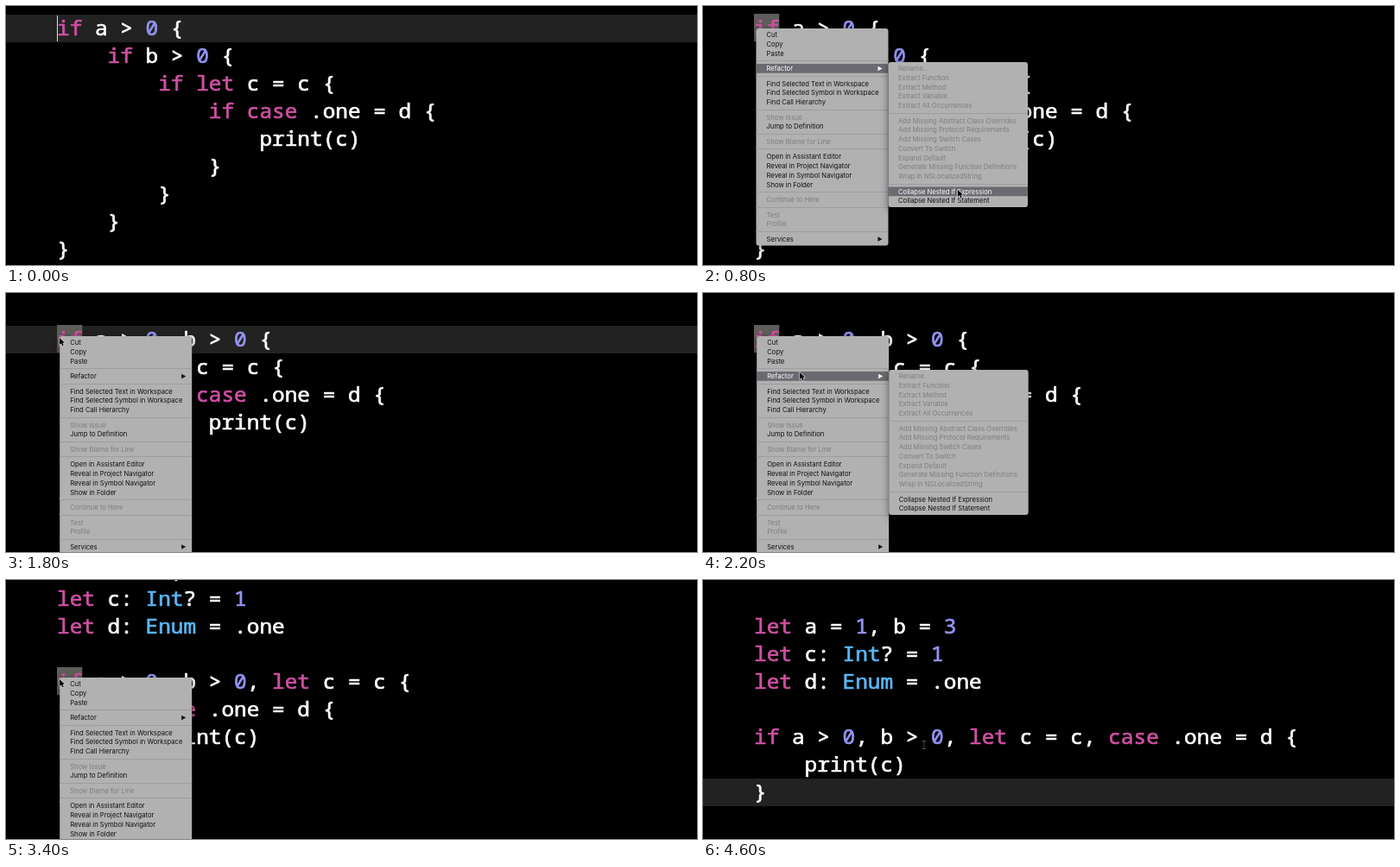
These frames come from a looping animation (800x300 px, 4.8 s). An HTML page with a canvas:

```html
<!DOCTYPE html>
<html lang="en">
<head>
<meta charset="utf-8">
<title>Collapse nested ifs</title>
<style>
html, body { margin: 0; width: 100%; height: 100%; overflow: hidden; background: #000; }
canvas { display: block; }
</style>
</head>
<body>
<canvas id="stage" width="800" height="300"></canvas>
<script>
const ctx = document.getElementById('stage').getContext('2d');
const CODE_FONT = '500 24.4167px "Noto Sans Mono", "DejaVu Sans Mono", monospace';
const MENU_FONT = '7.66px Inter, "Liberation Sans", sans-serif';
const LEFT = 59, COL = 14.65, LINE = 32;
const ITEM = 10.75, GAP = 6.72, PAD = 2.1;
const STEP = 200, LOOP = 4800;

const decls = ['let a = 1, b = 3', 'let c: Int? = 1', 'let d: Enum = .one', ''];

// Nested ifs, one indent deeper per condition, closed in reverse.
function nest(...conds) {
  const pad = n => '    '.repeat(n);
  return [
    ...conds.map((c, i) => `${pad(i)}if ${c} {`),
    pad(conds.length) + 'print(c)',
    ...conds.map((c, i) => pad(conds.length - 1 - i) + '}')
  ];
}

const codes = {
  four: { top: 10, lines: nest('a > 0', 'b > 0', 'let c = c', 'case .one = d') },
  three: { top: 38, lines: nest('a > 0, b > 0', 'let c = c', 'case .one = d') },
  two: { top: -26, lines: [...decls, ...nest('a > 0, b > 0, let c = c', 'case .one = d')] },
  one: { top: 38, lines: [...decls, ...nest('a > 0, b > 0, let c = c, case .one = d')] }
};

// "-" is a separator, "~" marks a disabled item, ">" a submenu.
const mainMenu = ['Cut', 'Copy', 'Paste', '-', 'Refactor>', '-',
  'Find Selected Text in Workspace', 'Find Selected Symbol in Workspace', 'Find Call Hierarchy', '-',
  '~Show Issue', 'Jump to Definition', '-', '~Show Blame for Line', '-',
  'Open in Assistant Editor', 'Reveal in Project Navigator', 'Reveal in Symbol Navigator', 'Show in Folder', '-',
  '~Continue to Here', '-', '~Test', '~Profile', '-', 'Services>'];
const subMenu = ['~Rename...', '~Extract Function', '~Extract Method', '~Extract Variable',
  '~Extract All Occurrences', '-', '~Add Missing Abstract Class Overrides',
  '~Add Missing Protocol Requirements', '~Add Missing Switch Cases', '~Convert To Switch',
  '~Expand Default', '~Generate Missing Function Definitions', '~Wrap In NSLocalizedString', '-',
  'Collapse Nested If Expression', 'Collapse Nested If Statement'];

// Each step overrides the one before; a step with "code" starts afresh.
const steps = [
  { code: 'four', row: 10, caret: 0 },
  { row: null, caret: null, sel: true, menu: 26, tip: [62, 27] },
  { hot: true, sub: true, tip: [80, 70] },
  { tip: [224, 88] },
  { pick: true, tip: [295, 213] },
  { menu: null, tip: null, beam: [295, 216] },
  { code: 'three', row: 230, caret: 1, brace: true, beam: [345, 24] },
  { brace: false, caret: null, beam: [62, 52] },
  { row: 38, caret: 0 },
  { caret: null, sel: true, menu: 50, beam: null, tip: [62, 52] },
  { row: null, tip: [95, 75] },
  { hot: true, sub: true, tip: [112, 92] },
  { pick: true, tip: [290, 235] },
  { tip: [296, 237] },
  { code: 'two', row: 230, caret: 1, brace: true, beam: [190, 89] },
  { brace: false, caret: null, beam: [48, 116] },
  { caret: 1, beam: [62, 117] },
  { row: null, caret: null, sel: true, menu: 113, beam: null, tip: [62, 115] },
  { hot: true, tip: [100, 156] },
  { sub: true, tip: [279, 201] },
  { tip: [282, 297] },
  { sub: false, tip: null },
  { code: 'one', row: 230, caret: 1, brace: true, beam: [256, 191] },
  { brace: false, caret: null }
];
const states = [];
for (const s of steps) states.push(s.code ? s : { ...states.at(-1), ...s });

function rect(color, x, y, w, h, r = 0) {
  ctx.fillStyle = color;
  ctx.beginPath();
  ctx.roundRect(x, y, w, h, r);
  ctx.fill();
}

function colorOf(word) {
  if (/^(if|let|case)$/.test(word)) return '#d050a4';
  if (/^(Int|Enum)$/.test(word)) return '#5ab8f6';
  if (/^\d/.test(word)) return '#9494f4';
  return '#fff';
}

function drawCode({ code, row, caret, sel, brace }) {
  const { top, lines } = codes[code];
  const first = lines.findIndex(l => l.startsWith('if'));
  const ifTop = top + first * LINE;
  if (row != null) rect('#222', 0, row, 800, LINE);
  if (sel) rect('#5f5d59', LEFT, ifTop - 1, 2 * COL, LINE);
  if (brace) rect('#fdf65a', LEFT + (lines[first].length - 1) * COL - 1.5, ifTop - 1, 17, LINE, 5);
  ctx.font = CODE_FONT;
  ctx.textBaseline = 'alphabetic';
  ctx.lineWidth = .7;
  ctx.lineJoin = 'round';
  lines.forEach((line, i) => {
    for (const { 0: word, index } of line.matchAll(/\w+|[^\w\s]/g)) {
      const x = LEFT + index * COL, y = top + i * LINE + 23.7;
      ctx.fillStyle = ctx.strokeStyle = colorOf(word);
      ctx.fillText(word, x, y);
      ctx.strokeText(word, x, y); // a slightly heavier weight
    }
  });
  if (caret != null) rect('#ddd', LEFT + caret * COL, row + 1, 1, LINE - 2);
}

function drawMenu(items, x, y, w, indent, active) {
  const gaps = items.filter(i => i === '-').length;
  const h = (items.length - gaps) * ITEM + gaps * GAP + 2 * PAD;
  ctx.save();
  ctx.shadowColor = 'rgba(0,0,0,.5)';
  ctx.shadowBlur = 8;
  ctx.shadowOffsetY = 3;
  rect('#b1b1b1', x, y, w, h, 3);
  ctx.restore();
  ctx.font = MENU_FONT;
  ctx.textBaseline = 'alphabetic';
  let top = y + PAD;
  for (const item of items) {
    if (item === '-') {
      rect('#9d9d9d', x, Math.round(top + GAP / 2 - .5), w, 1);
      top += GAP;
      continue;
    }
    const label = item.replace(/[~>]/g, ''), on = label === active, mid = top + ITEM / 2;
    if (on) rect('#6b6a70', x, top, w, ITEM);
    ctx.fillStyle = on ? '#fff' : item[0] === '~' ? '#7e7e7e' : '#111';
    ctx.fillText(label, x + indent, mid + 2.8);
    if (item.endsWith('>')) {
      const tx = x + w - 12;
      ctx.beginPath();
      ctx.moveTo(tx, mid - 2.7);
      ctx.lineTo(tx + 5, mid);
      ctx.lineTo(tx, mid + 2.7);
      ctx.fill();
    }
    top += ITEM;
  }
}

function drawArrow([x, y]) {
  const p = new Path2D(`M${x} ${y}v8l1.9-1.7 1.4 3 1.4-.6-1.3-2.9h2.5z`);
  ctx.lineWidth = 1.2;
  ctx.strokeStyle = '#ddd';
  ctx.stroke(p);
  ctx.fillStyle = '#000';
  ctx.fill(p);
}

function drawBeam([x, y]) {
  ctx.lineWidth = 1;
  ctx.strokeStyle = '#4c4c4c';
  ctx.stroke(new Path2D(`M${x - 2.5} ${y - 4.5}h5M${x} ${y - 4.5}v9M${x - 2.5} ${y + 4.5}h5`));
}

function draw(state) {
  rect('#000', 0, 0, 800, 300);
  drawCode(state);
  if (state.menu != null) {
    const x = state.menu === 26 ? 61.5 : 62.2;
    drawMenu(mainMenu, x, state.menu, 153, 12, state.hot && 'Refactor');
    if (state.sub) {
      const subTop = state.menu + 3 * ITEM + GAP;
      drawMenu(subMenu, x + 153, subTop, 161.5, 11.5, state.pick && 'Collapse Nested If Expression');
    }
  }
  if (state.tip) drawArrow(state.tip);
  if (state.beam) drawBeam(state.beam);
}

const start = performance.now();
function tick() {
  const t = (performance.now() - start) % LOOP;
  draw(states[Math.floor(t / STEP)]);
  requestAnimationFrame(tick);
}
tick();
</script>
</body>
</html>
```
